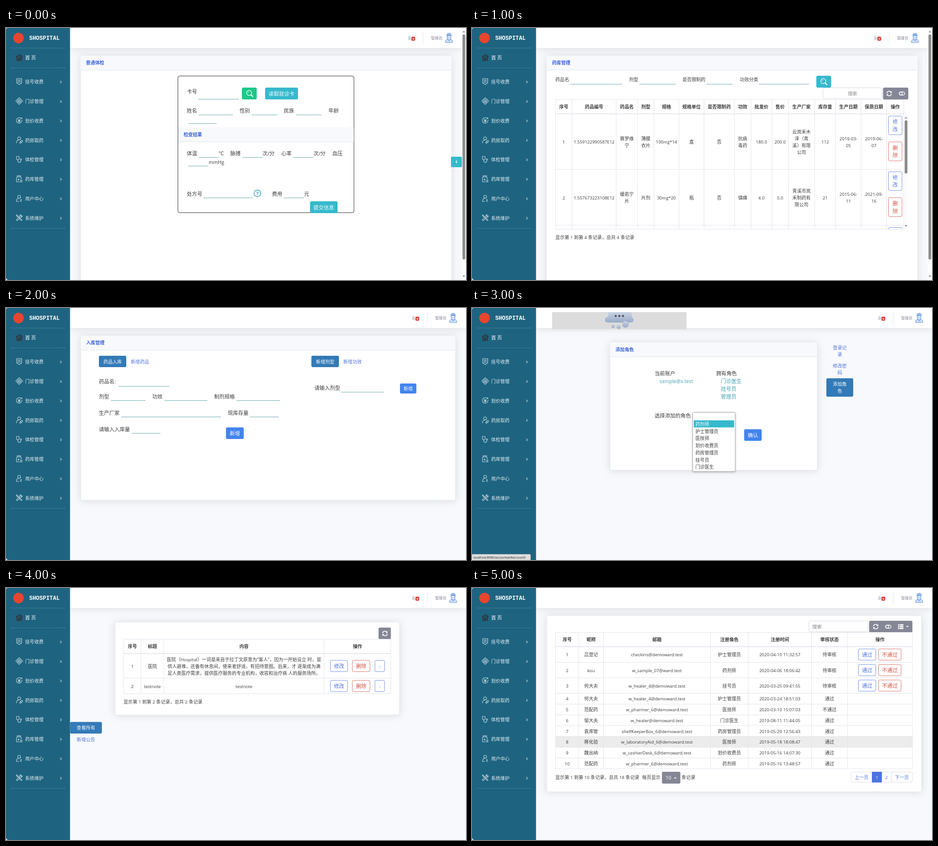
These frames come from a looping animation (1010 by 554 pixels, 6 s). An HTML page:

```html
<!DOCTYPE html>
<html lang="zh-CN">
<head>
<meta charset="utf-8">
<title>SHOSPITAL</title>
<style>
html, body { margin: 0; width: 100%; height: 100%; overflow: hidden; background: #fff; }
svg { display: block; width: 1010px; height: 554px; border-radius: 0 0 5px 5px; }
text { font-family: "Open Sans", "Noto Sans CJK SC", "Noto Sans CJK", sans-serif; white-space: pre; }
.brand { font: bold 12.4px "Liberation Mono", monospace; }
.shadow { filter: drop-shadow(0 1.5px 9px rgba(58, 59, 69, .15)); }
.ico { fill: none; stroke-linecap: round; stroke-linejoin: round; }
.page { visibility: hidden; animation: show 6s step-end infinite; }
@keyframes show {
  0% { visibility: visible; }
  16.666% { visibility: hidden; }
}
</style>
</head>
<body>
<svg id="stage" viewBox="0 0 1010 554"></svg>
<script>
const INK = '#3c3c3e', BLUE = '#4e73df', TITLE = '#3b62d2', CYAN = '#36b9cc', GREY = '#858796';
const TAB = '#337ab7', ACTION = '#4284ee', RED = '#d2503f', EDGE = '#e1e4ec', PALE = '#f8f9fc';
const BODY = 10.1, BIG = 11.36, SIDE = 140.6;

// Text is placed by its vertical centre; "|" breaks lines. Latin runs are set slightly smaller.
function text(x, y, str, { size = BODY, fill = INK, bold = 0, mid = 0, lh = 15 } = {}) {
  const lines = String(str).split('|');
  return lines.map((line, i) => {
    const cy = y + (i - (lines.length - 1) / 2) * lh + size * .37;
    const runs = line.replace(/[!-~]+/g, run => `<tspan font-size="${(size * .945).toFixed(2)}">${run}</tspan>`);
    return `<text x="${x}" y="${cy.toFixed(2)}" font-size="${size}" fill="${fill}"` +
      `${bold ? ' font-weight="700"' : ''}${mid ? ' text-anchor="middle"' : ''}>${runs}</text>`;
  }).join('');
}
const mid = (x, y, str, opt) => text(x, y, str, { ...opt, mid: 1 });

const rect = (x1, y1, x2, y2, fill, extra = '') =>
  `<rect x="${x1}" y="${y1}" width="${x2 - x1}" height="${y2 - y1}" fill="${fill}" ${extra}/>`;
const path = (d, stroke, width = 1, fill = 'none') =>
  `<path d="${d}" stroke="${stroke}" stroke-width="${width}" fill="${fill}"/>`;
const circle = (x, y, r, fill, extra = '') => `<circle cx="${x}" cy="${y}" r="${r}" fill="${fill}" ${extra}/>`;
const icon = (x, y, body) => `<g class="ico" transform="translate(${x} ${y})">${body}</g>`;

const button = (x1, y1, x2, y2, fill, label = '', size = BIG) =>
  rect(x1, y1, x2, y2, fill, 'rx="3"') +
  mid((x1 + x2) / 2, (y1 + y2) / 2 + .3, label, { size, fill: '#fff' });
const outline = (x1, y1, x2, y2, color, label) =>
  rect(x1 + .4, y1 + .4, x2 - .4, y2 - .4, '#fff', `rx="3" stroke="${color}" stroke-width=".8"`) +
  mid((x1 + x2) / 2, (y1 + y2) / 2 + .3, label, { size: BIG, fill: color, lh: 16.5 });

// Each field: label x, label, line start, line end.
const fields = (y, lineY, list, size = BIG) => list.map(([x, label, a, b]) =>
  text(x, y, label, { size }) + (a ? rect(a, lineY - .5, b, lineY + .5, '#6aa9ab') : '')).join('');

function grid(xs, ys, bottom = ys.at(-1)) {
  const v = xs.map(x => `M${x} ${ys[0]}V${bottom}`).join('');
  const h = ys.map(y => `M${xs[0]} ${y}H${xs.at(-1)}`).join('');
  return path(v + h, EDGE) + path(`M${xs[0]} ${ys[1]}H${xs.at(-1)}`, EDGE, 1.6);
}
const cells = (xs, y, list, opt) =>
  list.map((str, i) => mid((xs[i] + xs[i + 1]) / 2, y, str, opt)).join('');

function card(x1, y1, x2, y2, title) {
  const head = title ? rect(x1 + .5, y1 + .5, x2 - .5, y1 + 32, PALE, 'rx="3"') +
    path(`M${x1} ${y1 + 32.5}H${x2}`, EDGE) + text(x1 + 12.5, y1 + 16, title, { fill: TITLE, bold: 1 }) : '';
  return rect(x1 + .4, y1 + .4, x2 - .4, y2 - .4, '#fff', `rx="3" stroke="${EDGE}" stroke-width=".8" class="shadow"`) + head;
}

const lens = (x, y) => icon(x, y,
  circle(-1.2, -1.2, 5.6, 'none', 'stroke="#fff" stroke-width="1.2"') +
  path('M-4.2 -1.4A3 3 0 0 1 -1.4 -4.2', '#fff', .8) + path('M3 3L7 6.8', '#fff', 2));
const refresh = (x, y) => icon(x, y,
  path('M-5 -1A5 5 0 0 1 4 -3M5 1A5 5 0 0 1 -4 3', '#fff', 1.6) +
  path('M5.6 -5.4V-1.2H1.4ZM-5.6 5.4V1.2H-1.4Z', 'none', 0, '#fff'));
const toggle = (x, y) => icon(x, y,
  rect(-6, -3.6, 6, 3.6, 'none', 'rx="3.6" stroke="#fff" stroke-width="1.5"') +
  circle(-2.4, 0, 3.2, 'none', 'stroke="#fff" stroke-width="1.4"'));
const triangle = (x, y, dir, fill, w = 3) => path(`M${x - w} ${y + dir * w / 2}h${2 * w}l${-w} ${-dir * w}z`, 'none', 0, fill);

const bar = (x, top, bottom, from, to) =>
  rect(x - 3, from, x + 3, to, '#8b8b8b', 'rx="3"') +
  triangle(x, top, 1, '#777') + triangle(x, bottom, -1, '#777');

function topBar(right) {
  const dx = right - 1001;
  return rect(140, 0, 1010, 554, PALE) + rect(140, 0, right, 44, '#fff', 'class="shadow"') +
    `<g transform="translate(${dx} 0)">` +
    path('M882 25.5Q883.5 24 883.5 21.5Q883.5 18 886 17.6Q888.5 18 888.5 21.5Q888.5 24 890 25.5ZM885 26.3h2', '#d1d3e2', .6, '#d1d3e2') +
    rect(890, 19, 898.3, 28, '#dc4a3c', 'rx="2"') + mid(894.1, 23.5, '4', { size: 6.4, fill: '#fff', bold: 1 }) +
    path('M916 10V34', '#e3e6f0') + text(933, 22, '管理员', { size: 8.4, fill: GREY }) +
    icon(972.7, 22,
      path('M-8 9.5Q-8 3.5 -3 2.5H3Q8 3.5 8 9.5Z', '#4a80d6', .9, '#cfe0fa') +
      path('M-4.3 -5V-2Q-4 3.4 0 3.8Q4 3.4 4.3 -2V-5Z', '#4a80d6', .9, '#eef4ff') +
      path('M-4.8 -5Q-5 -10.5 0 -10.5Q5 -10.5 4.8 -5Z', '#4a80d6', .9, '#a9c7f5') +
      path('M-4 -.5H4M-3 2.5L0 7L3 2.5M-3 -7H3', '#4a80d6', .8)) + '</g>';
}
const pageBar = () => rect(1001, 0, 1010, 554, '#fcfcfc') + bar(1005.3, 8, 546, 14, 509);
const sideTab = () => rect(977, 283, 1001, 306, CYAN, 'rx="2"') + path('M990.5 291.5l-2.7 2.8 2.7 2.8', '#fff', 1.5);

function sidebar() {
  const pale = '#c9dce4';
  const person = 'M3 -3.5A3.2 3.2 0 1 1 -3.4 -3.5A3.2 3.2 0 0 1 3 -3.5M-6 6.5Q-6 .5 -1.5 .3';
  const items = [
    ['挂号收费', 'M-5.5 -6.5H5.5V3L0 6.5L-5.5 3ZM-3 -3.5H3M-3 -1H3M-3 1.5H3'],
    ['门诊管理', 'M0 -7.5L7.5 0L0 7.5L-7.5 0ZM-3.6 0A3.6 3.6 0 1 1 3.6 0A3.6 3.6 0 1 1 -3.6 0M0 -2V2M-2 0H2'],
    ['划价收费', 'M3 -5.5A6.2 6.2 0 1 0 6 -1M-2.5 -3L0 0L2.5 -3M0 0V4M-2.5 .3H2.5M-2.5 2.2H2.5M5 -6.5V-3.5M3.5 -5H6.5'],
    ['药房取药', person + 'M1 5L4.5 1.5A1.7 1.7 0 0 1 7 4L3.5 7A1.7 1.7 0 0 1 1 5M2.8 3.2L5.2 5.6'],
    ['体检管理', 'M-4 -6.5H-6V-2.5Q-6 1 -3.2 1Q-.4 1 -.4 -2.5V-6.5H-2M-3.2 1V3Q-3 6.5 .3 6.5Q3.5 6.5 3.5 3.2V1.8M2 0A1.6 1.6 0 1 1 5.2 0A1.6 1.6 0 1 1 2 0'],
    ['药库管理', 'M-4.5 -6.8H3V-4.4H-4.5ZM-3.8 -4.4L-6 -2V6.5H1M2.3 -4.4L4.5 -2V0M-3.4 1.5H.6M-1.4 -.5V3.5M2.5 2.5H6.5M2.5 4.5H6.5M2.5 6.5H6.5'],
    ['用户中心', person + 'M-6 6.8H-1M2.5 2.5H5M2.5 4.6H5M2.5 6.8H5'],
    ['系统维护', 'M-6.5 -6.5L-4 -5.5L5.8 4.5Q6.5 6.5 4.5 5.8L-5.5 -4ZM6.8 -4.5L4.5 -2.8L3 -4.2L4.6 -6.6Q1 -7 1 -3L-6 4.2Q-6.5 6.8 -4 6L3 -1Q7 -1 6.8 -4.5']
  ];
  const menu = items.map(([label, d], i) => {
    const y = 118.6 + i * 42.78;
    return icon(29, y - .8, path(d, pale, 1.1)) + text(42, y, label, { fill: '#e6eff3' }) +
      path(`M119.2 ${y - 2.5}l2.6 2.6-2.6 2.6`, '#b4cbd5', 1.3);
  }).join('');
  return path(`M0 4Q0 0 4 0H${SIDE}V554H6Q0 554 0 548Z`, 'none', 0, '#1e6480') +
    circle(27.5, 22, 11.5, '#e8452f') +
    '<text class="brand" x="51" y="26" fill="#fff">SHOSPITAL</text>' +
    path('M10 44H131M10 87.5H131M10 440.5H131', 'rgba(255,255,255,.16)') +
    icon(29, 65, path('M-6.5 -2L0 -6.5L6.5 -2M-4.8 -2.5V6.5H4.8V-2.5M-2 6V1.5H2V4H0M-2.5 -1.5H2.5M3.5 -6.5V-4.5', '#352a2c', 1.5)) +
    text(42, 65, '首 页', { fill: '#fff', size: 10.6 }) + menu;
}

function checkup() {
  return topBar(1001) + card(163, 60, 979, 570, '普通体检') +
    rect(377.5, 105.5, 764, 406, '#fff', 'rx="4" stroke="#2b2b2b"') +
    rect(378, 218.5, 763.5, 250, PALE) + path('M378 250.5H763.5', EDGE) +
    text(390, 234.3, '检查结果', { fill: TITLE, bold: 1 }) +
    fields(139.5, 156.5, [[397, '卡号', 423, 511]]) +
    button(518, 131, 550.5, 157, '#1cc88a') + lens(535, 144) +
    button(569, 131, 641, 157, CYAN, '读取就诊卡') +
    fields(182, 191, [[397, '姓名', 423, 498], [513, '性别', 539, 596], [610, '民族', 637, 693], [708, '年龄']]) +
    fields(201, 210, [[397, '', 400, 463]]) +
    fields(275.5, 284.5, [[397, '体温', 423, 467], [467, '℃'], [492.5, '脉搏', 519, 563], [563, '次/分'],
      [604.5, '心率', 631, 675], [675, '次/分'], [716.5, '血压']]) +
    fields(294.5, 303.5, [[445, 'mmHg', 400, 444]]) +
    fields(364.3, 373.5, [[397, '处方号', 434, 541], [584, '费用', 610, 654], [654.5, '元']]) +
    circle(552, 363.5, 7.3, '#fff', 'stroke="#2fa6b8" stroke-width="1.5"') +
    mid(552, 363.5, '?', { size: 12, fill: '#2fa6b8', bold: 1 }) +
    button(667.5, 381, 728, 407, CYAN, '提交信息') + sideTab() + pageBar();
}

function stock() {
  const xs = [183.5, 219.5, 316.5, 363.5, 399.5, 454.5, 509.5, 576, 612.5, 658.5, 694.5, 752.5, 798.5, 854.5, 910.5, 948];
  const head = ['序号', '药品编号', '药品名', '剂型', '规格', '规格单位', '是否限制药', '功效', '批发价', '售价',
    '生产厂家', '库存量', '生产日期', '保质日期', '操作'];
  const rows = [
    [1, '1.559122990587E12', '赛罗维|宁', '薄膜|衣片', '100mg*14', '盒', '否', '抗病|毒药', '180.0', '200.0',
      '云岚禾木|泽（青|溪）有限|公司', 112, '2019-03-|05', '2019-06-|07'],
    [2, '1.557673223108E12', '缓若宁|片', '片剂', '30mg*20', '瓶', '否', '镇痛', '4.0', '5.0',
      '青溪市岚|禾制药有|限公司', 21, '2015-06-|11', '2021-09-|16']
  ];
  const body = rows.map((row, i) => {
    const y = i * 122.5;
    return cells(xs, 250.3 + y, row) + outline(914, 193 + y, 944.5, 235 + y, BLUE, '修|改') +
      outline(914, 250 + y, 944.5, 292.5 + y, RED, '删|除');
  }).join('');
  return topBar(1001) + card(163, 60, 979, 570, '药库管理') +
    fields(113.5, 123.5, [[183, '药品名', 216.5, 329], [345, '剂型', 368, 447], [462, '是否限制药', 515, 572],
      [588, '功效分类', 630, 740]], BODY) +
    button(756, 105, 788.5, 131, CYAN) + lens(772.5, 118) +
    rect(770.5, 131.5, 900.5, 155, '#fff', 'rx="3" stroke="#d5d8e3"') + mid(835.5, 144, '搜索', { fill: '#888' }) +
    button(902.5, 131, 958, 157, GREY) + refresh(916, 144) + toggle(944, 144) +
    grid(xs, [157.5, 188.5, 311, 433.5, 442.5]) + cells(xs, 172.8, head, { bold: 1 }) + body +
    path('M914.5 442V441Q914.5 438.5 917 438.5H941.5Q944 438.5 944 441V442', BLUE, .8) +
    rect(948.5, 189, 957.5, 442, '#fcfcfc') + bar(953, 197, 435, 203, 320) +
    text(183, 460, '显示第 1 到第 4 条记录，总共 4 条记录') + pageBar();
}

function intake() {
  const link = { fill: BLUE };
  return topBar(1010) + card(163.5, 60, 987.5, 423, '入库管理') +
    button(204, 105, 264, 130, TAB, '药品入库', BODY) + text(274, 118, '新增药品', link) +
    button(670.5, 105, 731, 130, TAB, '新增剂型', BODY) + text(740.5, 118, '新增功效', link) +
    fields(162, 172.3, [[204, '药品名:', 246.5, 359]]) +
    fields(194.5, 203.5, [[204, '剂型', 230.5, 306], [321, '功效', 348, 442], [457, '制剂规格', 506, 602]]) +
    fields(230.3, 239.5, [[204, '生产厂家', 253, 472], [487, '现库存量', 536, 599]]) +
    fields(266.3, 275.5, [[204, '请输入入库量', 276, 339]]) +
    button(483, 262.5, 522, 288, ACTION, '新增') +
    fields(175.8, 185, [[677, '请输入剂型', 736, 830.5]]) +
    button(865, 166, 901, 188, ACTION, '新增', BODY);
}

function roles() {
  const teal = { size: BIG, fill: '#3fa3b3' };
  const options = ['药剂师', '护士管理员', '医技师', '划价收费员', '药房管理员', '挂号员', '门诊医生'];
  const puff = (x, y, r) => circle(x, y, r, 'url(#cloud)');
  return topBar(1010) + rect(176, 9, 471, 47, '#dcdcdc') +
    path('M299 9H350Q350 20 355 25Q356 32 346 32H300Q291 32 292 25Q293 20 299 19Z', 'none', 0, 'url(#cloud)') +
    puff(310, 40, 3.8) + puff(322, 41.5, 4.6) + puff(337, 36, 7.3) +
    [315.5, 323.5, 331.5].map(x => circle(x, 17.5, 2.3, '#4a4d57')).join('') +
    card(302.5, 75, 758.5, 357, '添加角色') +
    fields(143.5, 0, [[401, '当前账户'], [536, '拥有角色']]) +
    text(412, 160.5, 'sample@x.test', teal) +
    text(546.5, 177.5, '门诊医生|挂号员|管理员', { ...teal, lh: 17 }) +
    text(401, 237, '选择添加的角色', { size: BIG }) +
    rect(484.5, 229.5, 578, 359.5, '#fff', 'rx="2" stroke="#a5a5a5" style="filter:drop-shadow(0 1px 2px rgba(0,0,0,.25))"') +
    rect(487, 247, 575.5, 262.5, CYAN) +
    options.map((s, i) => text(490.5, 255.2 + i * 15.75, s, { fill: i ? INK : '#fff' })).join('') +
    button(597.5, 266.5, 636, 292, ACTION, '确认') +
    mid(807.5, 95, '登录记|录', { fill: BLUE }) + mid(807.5, 134.8, '修改密|码', { fill: BLUE }) +
    button(778, 154.5, 837, 195, TAB, '添加角|色', BODY);
}
const statusBar = () => rect(-1, 541.5, 128.5, 555, '#dedede', 'rx="2" stroke="#bbb"') +
  text(3, 548, 'localhost:8090/accountset#account3', { size: 7.1, fill: '#222' });

function notices() {
  const xs = [258.5, 296.5, 346.5, 698.5, 845];
  const story = '医院（Hospital）一词是来自于拉丁文原意为“客人”，因为一开始设立 时，是|' +
    '供人避难，还备有休息间，使来者舒适，有招待意图。后来，才 逐渐成为满|' +
    '足人类医疗需求，提供医疗服务的专业机构，收容和治疗病 人的服务场所。';
  const tools = y => outline(712, y, 750.5, y + 25.5, BLUE, '修改') +
    outline(760, y, 799.5, y + 25.5, RED, '删除') + outline(809.5, y, 831.5, y + 25.5, BLUE, '-');
  return topBar(1010) + card(239, 74.5, 864.5, 279.5) +
    button(818, 87, 845, 112.5, GREY) + refresh(832, 100) +
    grid(xs, [112.5, 144, 198, 232.5]) + cells(xs, 128.5, ['序号', '标题', '内容', '操作'], { bold: 1 }) +
    cells(xs, 172, [1, '医院', story]) + tools(158.7) +
    cells(xs, 216, [2, 'testnote', 'testnote']) + tools(202.7) +
    text(258, 250, '显示第 1 到第 2 条记录，总共 2 条记录') +
    button(SIDE, 294.6, 210.5, 320, TAB, '查看所有', BODY) + mid(175.5, 333, '新增公告', { fill: BLUE });
}

function accounts() {
  const xs = [183.5, 234.5, 288.5, 523.5, 606.5, 745.5, 824.5, 967];
  const short = i => 231.5 + i * 23.72;
  const ys = [97.5, 129, 163.5, 197.5, ...Array.from({ length: 8 }, (_, i) => short(i))];
  const rows = [
    ['吕登记', 'checkins', '护士管理员', '2020-04-10 11:32:57', '待审核'],
    ['kou', 'w_sample_07', '药剂师', '2020-04-06 18:06:42', '待审核'],
    ['何大夫', 'w_healer_4', '挂号员', '2020-03-25 09:41:55', '待审核'],
    ['何大夫', 'w_healer_4', '护士管理员', '2020-03-24 18:51:03', '通过'],
    ['范配药', 'w_pharmer_6', '医技师', '2020-03-10 15:07:03', '不通过'],
    ['邹大夫', 'w_healer', '门诊医生', '2019-08-11 11:44:05', '通过'],
    ['袁库管', 'shelfKeeperBox_6', '药房管理员', '2019-05-29 12:56:43', '通过'],
    ['蒋化验', 'w_laboratoryAid_6', '医技师', '2019-05-18 18:08:47', '通过'],
    ['魏出纳', 'w_cashierDesk_6', '划价收费员', '2019-05-16 14:07:30', '通过'],
    ['范配药', 'w_pharmer_6', '药剂师', '2019-05-16 13:48:57', '通过']
  ];
  const body = rows.map(([name, user, ...rest], i) => {
    const y = (ys[i + 1] + ys[i + 2]) / 2;
    const mail = user + (i === 1 ? '@ward.test' : '@demoward.test');
    return cells(xs, y + .3, [i + 1, name, mail, ...rest]) + (i < 3 ?
      outline(848, y - 12.7, 887, y + 12.8, BLUE, '通过') + outline(892, y - 12.7, 942.5, y + 12.8, RED, '不通过') : '');
  }).join('');
  const white = { size: BIG, fill: '#fff' }, link = { fill: BLUE };
  return topBar(1010) + card(163.5, 60, 987.5, 448.5) +
    rect(739.5, 72.5, 869.5, 96.5, '#fff', 'rx="3" stroke="#d5d8e3"') + text(747, 85, '搜索', { fill: '#888', size: 10.6 }) +
    button(872, 72, 967, 97.5, GREY) + refresh(886.5, 85) + toggle(914, 85) +
    [-3.9, 0, 3.9].map(d => rect(935.5, 83.6 + d, 938.3, 86.4 + d, '#fff') + rect(939.3, 83.6 + d, 947.2, 86.4 + d, '#fff')).join('') +
    triangle(956, 85, -1, '#fff') +
    rect(184, short(4), 967, short(5), '#ececec') + grid(xs, ys) +
    cells(xs, 113.5, ['序号', '昵称', '邮箱', '注册角色', '注册时间', '审核状态', '操作'], { bold: 1 }) + body +
    text(183, 416, '显示第 1 到第 10 条记录，总共 18 条记录') + text(373.5, 416, '每页显示') +
    button(417, 404, 457.5, 430, GREY) + text(425, 417, '10', white) + triangle(446.3, 417, 1, '#fff') +
    text(460, 416, '条记录') +
    rect(832.5, 404.5, 967, 427, '#fff', 'rx="3" stroke="#dddfeb"') + path('M920.5 404.5V427', '#dddfeb') +
    rect(878, 404, 900, 427.5, BLUE) + mid(855.5, 416, '上一页', link) +
    mid(889, 416, '1', { fill: '#fff' }) + mid(910, 416, '2', link) + mid(944, 416, '下一页', link);
}

const gradient = '<defs><linearGradient id="cloud" x1="0" y1="0" x2="0" y2="1">' +
  '<stop offset="0" stop-color="#c9d3e2"/><stop offset="1" stop-color="#98abc8"/></linearGradient></defs>';
const pages = [checkup, stock, intake, roles, notices, accounts];
const show = (body, i) => `<g class="page" style="animation-delay:${i}s">${body}</g>`;
document.getElementById('stage').innerHTML = gradient +
  pages.map((page, i) => show(page(), i)).join('') + sidebar() + show(statusBar(), 3);
</script>
</body>
</html>
```
